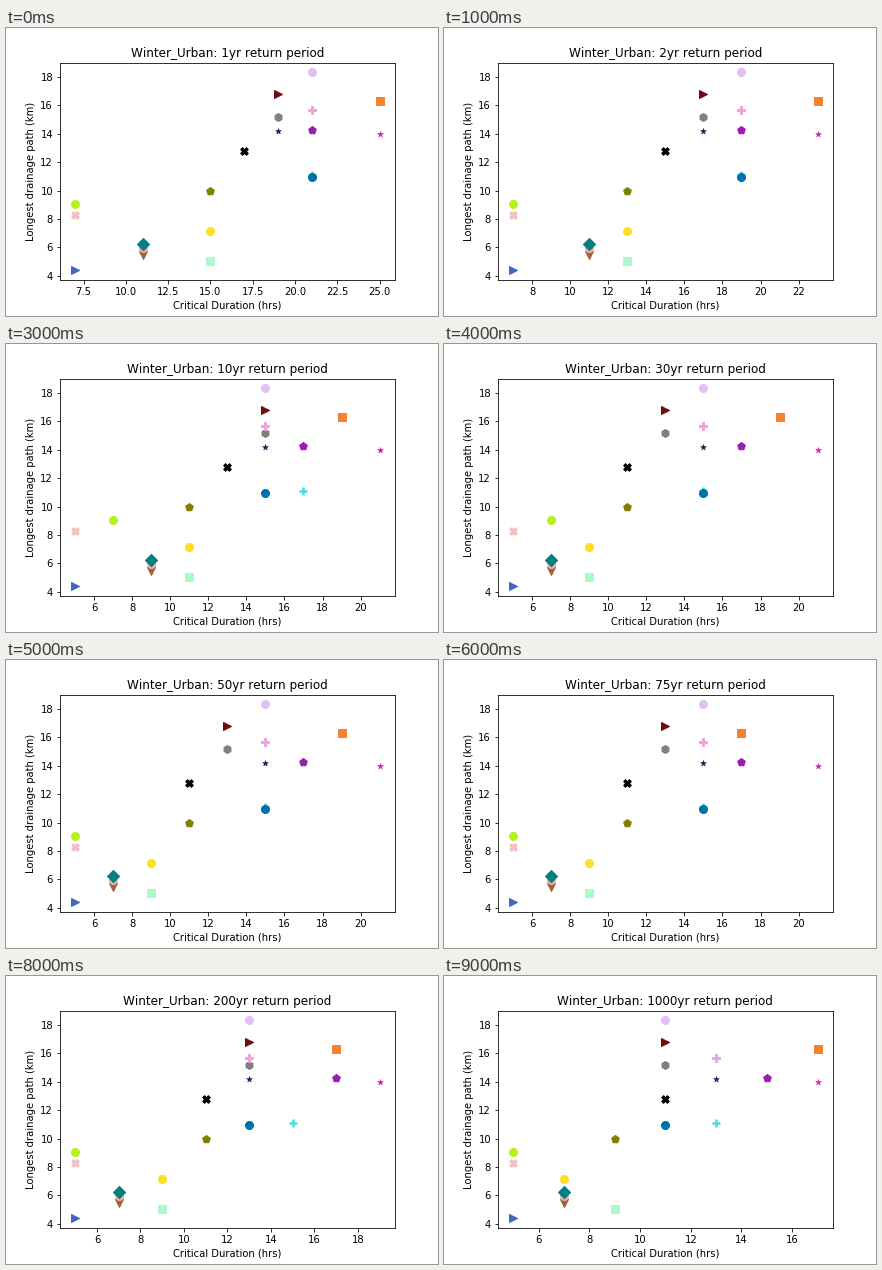
These frames come from a looping animation (432x288 px, 10 s). A matplotlib script:

```python
import math

import matplotlib.pyplot as plt
from matplotlib.animation import FuncAnimation

PERIODS = [1, 2, 5, 10, 30, 50, 75, 100, 200, 1000]
SIZE = {"*": 36, "D": 74, "X": 58, "+": 72}
EDGE = {"*": 0.5, "+": 2.6}

# marker, colour, path length (km), then base, drop and tail of the duration
SITES = [
    (">", "#4166bf", 4.41, 4.1, 3.0, 0),
    ("s", "#adf9c9", 5.03, 8.1, 6.4, 0),
    ("v", "#a0623a", 5.45, 6.2, 5.3, 0),
    ("o", "#eab0a6", 5.95, 6.2, 5.3, 0),
    ("D", "#008080", 6.27, 6.2, 5.3, 0),
    ("o", "#ffdf22", 7.15, 7.3, 7.5, 0),
    ("X", "#f1c1c1", 8.28, 4.8, 3.0, 0),
    ("o", "#b5f21c", 9.05, 5.45, 2.5, 0),
    ("p", "#808000", 10.0, 9.4, 5.4, 0),
    ("+", "#52dcdc", 11.06, 13.9, 8.0, 1.0),
    ("o", "#0070a8", 10.95, 12.75, 8.0, 1.5),
    ("X", "#000000", 12.75, 9.9, 6.4, 0),
    ("*", "#c022b0", 13.95, 19.65, 4.4, 2.2),
    ("*", "#10185c", 14.19, 13.2, 5.9, 0),
    ("p", "#9a1bb0", 14.23, 15.4, 5.9, 0),
    ("h", "#808080", 15.15, 11.9, 8.0, 1.0),
    ("P", "#f0a4dd", 15.67, 13.1, 7.0, 0),
    ("s", "#f58231", 16.28, 16.4, 8.0, 0),
    (">", "#700a12", 16.8, 11.3, 6.8, 0),
    ("o", "#e4bff6", 18.3, 12.75, 8.0, 1.5),
]

plt.rcParams.update({"font.family": "DejaVu Sans", "font.size": 10,
                     "text.kerning_factor": 6})
fig, ax = plt.subplots(figsize=(6, 4), dpi=72)
fig.subplots_adjust(left=0.125, right=0.9, bottom=0.125, top=0.88)


def duration(period, base, drop, tail):
    """Duration falls with the return period, in odd whole hours."""
    hours = base + drop * period ** -0.4 - tail * period / 1000
    return 2 * math.floor(hours / 2) + 1


def padded(vals):
    pad = 0.05 * (max(vals) - min(vals))
    return min(vals) - pad, max(vals) + pad


def draw(i):
    period = PERIODS[i]
    ax.clear()
    xs = [duration(period, *site[3:]) for site in SITES]
    ys = [site[2] for site in SITES]
    for x, y, (marker, color, *_) in zip(xs, ys, SITES):
        ax.scatter(x, y, s=SIZE.get(marker, 64), marker=marker, color=color,
                   linewidths=EDGE.get(marker, 1))
    ax.set_xlim(padded(xs))
    ax.set_ylim(padded(ys))
    ax.set_title(f"Winter_Urban: {period}yr return period")
    ax.set_xlabel("Critical Duration (hrs)")
    ax.set_ylabel("Longest drainage path (km)")


anim = FuncAnimation(fig, draw, frames=len(PERIODS), init_func=lambda: None,
                     interval=1000, repeat=True, repeat_delay=0)
plt.show()
```
